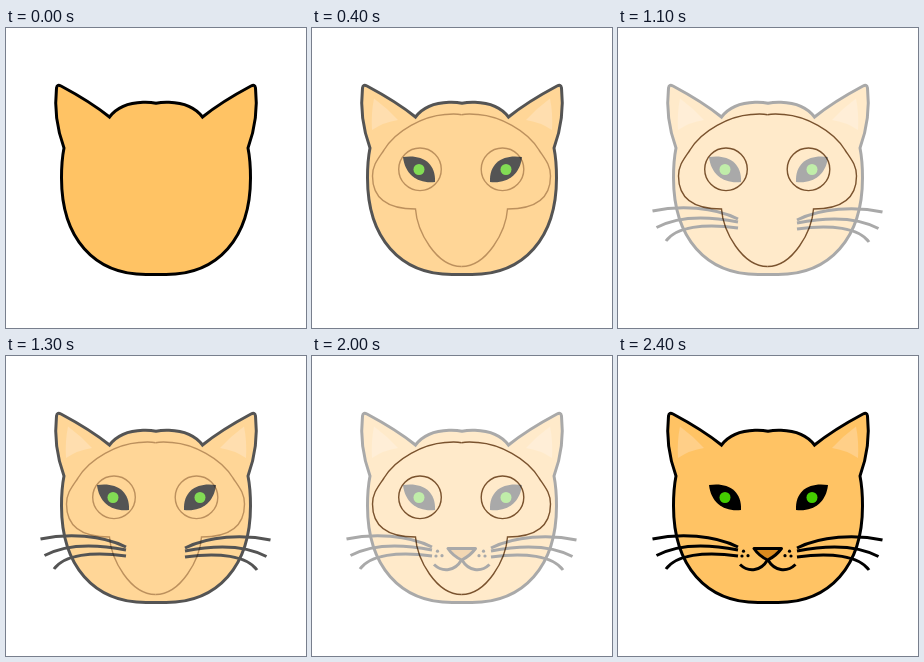
Animation of 300x300 px, one loop 3400 ms. Source, as an HTML page:

```html
<!DOCTYPE html>
<html lang="en">
<head>
<meta charset="utf-8">
<title>Drawing a cat</title>
<style>
  html, body { margin: 0; width: 100%; height: 100%; overflow: hidden; background: #fff; }
  svg { display: block; width: 100vw; height: 100vh; }
  .ink { fill: none; stroke: #000; stroke-width: 3; }
  #guide { fill: none; stroke: #7a5a3a; stroke-width: 1.4; mix-blend-mode: multiply; }
</style>
</head>
<body>
<svg viewBox="0 0 300 300">
  <g id="cat">
    <path id="head" class="ink" style="fill:#ffc364"/>
    <g id="eyes">
      <path data-mirror="300" fill="#ffcf88" d="M62 70.5 Q75 80 86 92 Q72 94 60 102 Q59 85 62 70.5 Z"/>
      <g data-mirror="301">
        <path d="M91 129 C109 126 124 134 123 154 C106 156 93 147 91 129 Z"/>
        <circle cx="107" cy="141.5" r="5.5" fill="#4c0"/>
      </g>
    </g>
    <g id="whiskers">
      <g data-mirror="299 1" class="ink">
        <path d="M34.5 183 C62 177 96 179 120 191"/>
        <path d="M38.5 199.5 C60 188 90 188 120 194"/>
        <path d="M48 213 C58 199 86 195 120 200"/>
      </g>
    </g>
    <g id="muzzle">
      <path data-mirror="299.5" class="ink" d="M122 208.5 C131 217 143 215 149.5 204"/>
      <g data-mirror="297">
        <circle cx="125.5" cy="195.2" r="1.6"/>
        <circle cx="124" cy="200" r="1.6"/>
        <circle cx="130" cy="199.7" r="1.6"/>
      </g>
      <path class="ink" style="fill:#d98a1e" stroke-linejoin="round"
        d="M136 192.5 H163.5 Q158 200 149.7 204 Q141 200 136 192.5 Z"/>
    </g>
  </g>
  <g id="guide">
    <path data-mirror="299" d="M149.5 86.8 C144 85.5 139 86 133 86.5 C112 88 84 102 72 122
      C66 131 60.5 137 60.5 148 C60.5 171 76 181 103.5 181
      C105 203 124 238.5 149.5 238.5"/>
    <circle data-mirror="298.5" cx="108" cy="141.3" r="21.3"/>
  </g>
</svg>
<script>
const $ = id => document.getElementById(id);
const LOOP = 3400, FIRST = 200, STAGE = 900, STEP = 200;
const parts = ["eyes", "whiskers", "muzzle"].map($);

// The head outline is one side, then the same points reflected in reverse.
const side = [
  [150, 75.3], [146, 74.3], [142, 74], [137, 74.2], [122, 74.7], [111, 79], [103.5, 89],
  [88, 76.5], [70, 66], [55, 58], [52.5, 56.8], [51, 57], [50.5, 60],
  [48.4, 79], [51, 101], [58, 120], [56, 130], [55.5, 140], [55.5, 150],
  [55.5, 210], [88, 246.5], [140, 246.5], [144, 246.5], [147, 246.5], [150, 246.5]
];
const other = side.map(([x, y]) => [300 - x, y]).reverse();
$("head").setAttribute("d", `M${side[0]} C${side.slice(1).join(" ")} ${other.slice(1).join(" ")} Z`);

document.querySelectorAll("[data-mirror]").forEach(half => {
  const copy = half.cloneNode(true);
  copy.setAttribute("transform", `translate(${half.dataset.mirror}) scale(-1 1)`);
  half.after(copy);
});

// Each stage adds a part, and the cat fades back in three steps over the guide.
function draw(t) {
  const stage = Math.min(Math.floor((t - FIRST) / STAGE), parts.length - 1);
  const step = stage < 0 ? 2 : Math.min(2, Math.floor((t - FIRST - stage * STAGE) / STEP));
  parts.forEach((p, i) => p.style.display = i <= stage ? "" : "none");
  $("cat").style.opacity = (step + 1) / 3;
  $("guide").style.opacity = 1 - step / 2;
}

const start = performance.now();
function tick() {
  draw((performance.now() - start) % LOOP);
  requestAnimationFrame(tick);
}
draw(0);
requestAnimationFrame(tick);
</script>
</body>
</html>
```
